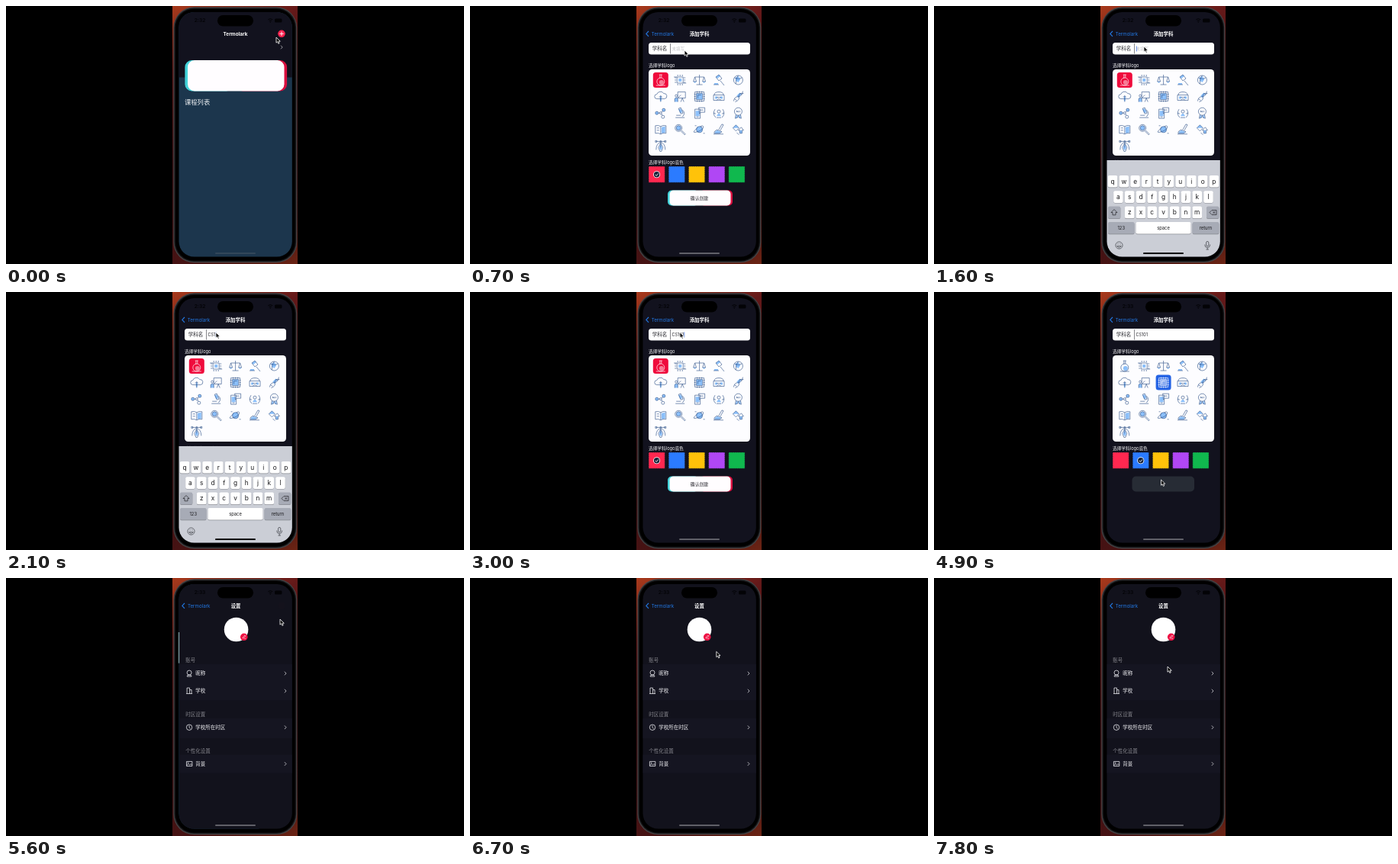
Recreate the animation shown at these times as an HTML page with a canvas. Size 600 px wide and 338 px high, loop 8 s.

```html
<!DOCTYPE html>
<html lang="zh">
<head>
<meta charset="utf-8">
<style>
html, body { margin: 0; width: 100%; height: 100%; overflow: hidden; background: #000; }
canvas { display: block; width: 600px; height: 338px; }
</style>
</head>
<body>
<canvas id="stage"></canvas>
<script>
const LOOP = 8000, STEP = 100, APP = 'Termolark';
const FONT = 'Inter, "Noto Sans CJK SC", "Noto Sans CJK", sans-serif';
const NIGHT = '#12121e', RED = '#fb2350', CYAN = '#43d3da', BACK = '#2278e4';
const SWATCHES = ['#ff2850', '#2b7bff', '#ffc20a', '#b047f4', '#10b84e'];

const canvas = document.getElementById('stage'), g = canvas.getContext('2d');
const ratio = window.devicePixelRatio || 1;
canvas.width = 600 * ratio;
canvas.height = 338 * ratio;

const clamp = v => Math.max(0, Math.min(1, v));
const span = (t, from, to) => clamp((t - from) / (to - from));
const easeOut = u => 1 - (1 - u) ** 3;
const smooth = u => u * u * (3 - 2 * u);

function box(x, y, w, h, r, fill) {
  g.beginPath();
  g.roundRect(x, y, w, h, r);
  g.fillStyle = fill;
  g.fill();
}
function disc(x, y, r, fill) {
  g.beginPath();
  g.arc(x, y, r, 0, 7);
  g.fillStyle = fill;
  g.fill();
}
function line(d, color, width = 0.8) {
  g.strokeStyle = color;
  g.lineWidth = width;
  g.stroke(new Path2D(d));
}
function text(s, x, y, size, color, weight = 400, align = 'left') {
  g.font = `${weight} ${size}px ${FONT}`;
  g.textAlign = align;
  g.fillStyle = color;
  g.fillText(s, x, y + size * 0.37);
}
function shifted(dx, dy, draw, alpha = 1) {
  g.save();
  g.translate(dx, dy);
  g.globalAlpha *= alpha;
  draw();
  g.restore();
}
const chevron = (x, y, color) => line(`M${x - 1} ${y - 2.3}l2.2 2.3l-2.2 2.3`, color);

// Subject icons: outline and tinted area, centred on the origin.
const ring = (x, y, r) => `M${x - r} ${y}a${r} ${r} 0 1 0 ${2 * r} 0a${r} ${r} 0 1 0 ${-2 * r} 0`;
const rect = (x, y, w, h = w) => `M${x} ${y}h${w}v${h}h${-w}z`;
const pins = [-3, 0, 3].map(p => `M${p} -7v2M${p} 5v2M-7 ${p}h2M5 ${p}h2`).join('');
const ICONS = [
  ['M-2 -7h4M-1 -7v5M1 -7v4' + ring(0, 2, 5) + 'M-6 7h12', ring(1, 3, 3)],
  [pins + rect(-4, -4, 8) + 'M-8 -4h4M4 4h4', rect(-2, -2, 4)],
  ['M0 -7V6M-4 6h8M-6 -4H6M-8 2l2 -6l2 6zM4 2l2 -6l2 6z', 'M-8 2h4l-2 2zM4 2h4l-2 2z'],
  ['M-4 -4l4 -3l4 5l-4 3zM2 1l5 6M-7 6h7', 'M-4 -4l4 -3l2 2l-4 3zM-6 4h5v2h-5z'],
  [ring(0, 0, 6) + 'M-5 -3q5 3 10 0M-3 5q-1 -6 3 -11', 'M-4 -3l4 -2l3 4l-3 4l-3 -2z'],
  ['M-5 3a3 3 0 0 1 0 -6a5 5 0 0 1 9 -1a3.5 3.5 0 0 1 1 7zM0 7v-8M-2 1l2 -2l2 2', 'M-1 0h2v6h-2z'],
  [rect(-3, -6, 10, 8) + ring(-5, -1, 1.5) + 'M-7 7v-4q2 -3 4 0v4M-3 2l4 -4M1 7l2 -5l2 5', rect(-7, 2, 4, 5)],
  [pins + rect(-6, -6, 12) + rect(-4, -4, 8) + 'M-2 2v-4h4', rect(-4, -4, 8)],
  [rect(-7, -2, 14, 7) + 'M-6 -2q0 -4 6 -4t6 4M-3 5q3 -4 6 0M-3 1h6', rect(-5, 0, 3) + rect(2, 0, 3)],
  ['M-6 6Q-5 0 0 0T6 -7M-4 7Q2 5 1 0T7 -4M-5 3l3 2M2 -4l3 1', 'M-2 -1l4 -4l2 2l-4 5z'],
  [ring(-5, 0, 2) + ring(4, -4, 2) + ring(3, 5, 2) + ring(0, 0, 1.5) + 'M-3 0h2M1 -1l2 -2M1 1l1 2', ring(-5, 0, 2) + ring(4, -4, 2)],
  ['M-2 -6l3 -1l3 7l-3 1zM3 -4q5 4 0 9M-6 6H6M-5 3h6', 'M-2 -5l3 -1l2 5l-3 1z'],
  [rect(-6, -5, 7, 12) + 'M-1 -7h8v6h-5l-2 2zM-4 5h3M1 -4h4', rect(-5, -3, 5, 7)],
  ['M-4 6q-5 -5 -1 -11M4 6q5 -5 1 -11M-7 0l3 1M7 0l-3 1M-3 6h6' + ring(0, -2, 2), 'M-3 4q3 -7 6 0z'],
  [ring(0, -2, 5) + 'M-3 2l-1 5l3 -1l1 -3l1 3l3 1l-1 -5M-2 -1v-2l2 2v-2M2 -3v2', 'M-3 3h2v3l-2 1zM1 3h2v4l-2 -1z'],
  ['M0 -4q-3 -2 -7 -1v10q4 -1 7 1q3 -2 7 -1v-10q-4 -1 -7 1v10M-5 -2h3M-5 1h3', 'M1 -3l5 -1v8l-5 1z'],
  [ring(-2, -2, 4.5) + ring(-2, -2, 3) + 'M1 2l5 5l1 -1l-5 -5', ring(-2, -2, 3)],
  [ring(0, 0, 4) + 'M-3 -2q-9 8 0 5t8 -7q0 -2 -4 0M5 5h2M-6 -5h2', ring(0, 0, 4)],
  ['M-7 6h13M-6 3q3 -4 6 -2l4 2l-3 2h-7zM0 0l4 -7l2 1l-4 7', 'M-5 3q3 -3 5 -1l3 1l-2 2h-6z'],
  ['M-3 -6l4 4l-4 4l-4 -4zM4 -3l3 4h-2v4h-3v-4h-2zM-2 4l3 3', 'M-3 -6l4 4h-8zM2 1h3v4h-3z'],
  ['M-6 -6H6' + rect(-7, -7, 2) + rect(5, -7, 2) + ring(0, -6, 1) + 'M-6 5q0 -8 6 -10q6 2 6 10M0 -4l-3 6l2 5h2l2 -5zM0 -4v6', 'M0 -3l-2 5l1 3h2l1 -3z']
].map(paths => paths.map(d => new Path2D(d)));

function icon(i, selected, color) {
  const x = 249.8 + 25.4 * (i % 5), y = 97 + 21.6 * Math.floor(i / 5);
  if (selected) box(x - 10, y - 10, 20, 20, 3.5, color);
  shifted(x, y, () => {
    const [outline, tint] = ICONS[i];
    g.fillStyle = selected ? '#ffffff77' : '#8cc0fa';
    g.fill(tint);
    g.strokeStyle = selected ? '#fff' : '#35578c';
    g.lineWidth = 0.65;
    g.stroke(outline);
  });
}

function offsetCard(x, y, w, h, r, gap) {
  box(x - gap, y, w / 2, h, r, CYAN);
  box(x + w / 2, y, w / 2 + gap, h, r, '#d80f3f');
  box(x, y, w, h, r, '#fffdff');
}

function home(t) {
  box(226, 0, 150, 338, 0, '#1c364d');
  box(226, 0, 150, 93.5, 0, NIGHT);
  chevron(361, 54, '#b9b9c0');
  offsetCard(238, 71, 126.5, 40.5, 9, 3.6);
  text('课程列表', 234, 126, 8.3, '#f3f5f7');
  if (t > 4900) {
    box(236, 144, 20, 20, 4, '#2463e4');
    shifted(-54.6, 35.4, () => icon(7, true, '#2463e4'));
    text('CS101', 266, 154, 7, '#fff', 600);
  }
}

function addPage(t) {
  const chosen = t >= 3600 ? 7 : 0, color = t >= 4300 ? 1 : 0;
  box(226, 0, 150, 338, 0, NIGHT);
  box(234, 48, 133, 15.5, 3.5, '#fff');
  text('学科名', 238.7, 56, 6.5, '#24242a');
  box(262, 49, 0.7, 13.5, 0, '#55555c');
  const typed = 'CS101'.slice(0, Math.max(0, Math.floor((t - 1700) / 180) + 1));
  if (typed) text(typed, 264.5, 56, 5.5, '#25252b');
  else text('未填写', 264.5, 56, 5.5, '#c5c5ca');
  if (t >= 1000 && t <= 3000) box(265 + g.measureText(typed).width, 52.5, 0.7, 7, 0, '#3b6fe0');

  text('选择学科logo', 234, 78, 5.7, '#f4f4f6');
  box(234, 83, 133, 113, 4.5, '#fdfdff');
  ICONS.forEach((_, i) => icon(i, i === chosen, color ? '#2463e4' : '#ef0b3c'));

  text('选择学科logo底色', 234, 205, 5.7, '#f4f4f6');
  SWATCHES.forEach((fill, i) => {
    const x = 234 + 26.2 * i;
    box(x, 210, 21.3, 21.3, 0, fill);
    g.setLineDash([1.2, 1.2]);
    line(rect(x, 210, 21.3), NIGHT, 0.8);
    g.setLineDash([]);
    if (i === color) {
      disc(x + 10.6, 220.8, 4.5, '#fff');
      disc(x + 10.6, 220.8, 3.7, '#18233a');
      line(`M${x + 8.7} 220.8l1.5 1.6l2.6 -3`, '#fff', 0.9);
    }
  });

  if (t >= 4800) {
    box(259.5, 241.5, 81.5, 20, 5, '#272c35');
  } else {
    offsetCard(261.5, 241.5, 80, 20, 5, 2.5);
    text('确认创建', 300.5, 252, 5.85, '#222228', 400, 'center');
  }
}

function settings() {
  box(226, 0, 150, 338, 0, '#12121c');
  disc(300.5, 67.5, 15.8, '#fff');
  disc(310.7, 77.3, 4.8, '#ee1244');
  line('M309 79l.4 -1.5l2.6 -2.6l1 1l-2.6 2.6zM311 79.3h2', '#fff', 0.6);
  for (const [label, y, height] of [['账号', 108, 47], ['时区设置', 179, 26], ['个性化设置', 226.5, 24]]) {
    text(label, 234.2, y, 6.5, '#85858c');
    box(226, y + 5, 150, height, 0, '#151521');
  }
  for (const [label, y] of [['昵称', 125], ['学校', 148], ['学校所在时区', 195.7], ['背景', 243.5]]) {
    text(label, 247.2, y, 6.5, '#f2f2f5', 500);
    chevron(364.8, y, '#d2d2d7');
  }
  line(ring(239, 124, 3) + 'M236 129q0 -2 3 -2t3 2z', '#e8e8ec');
  line('M236 151.5v-7.5h3.5v7.5M239.5 146.5h2.5v5M235 151.5h8', '#e8e8ec');
  line(ring(239, 195.7, 3.7) + 'M239 193.3v2.6l1.6 1.4', '#e8e8ec');
  line(rect(235.4, 240.4, 7.4, 6) + 'M235.6 245.5l2.4 -2l1.6 1.4l1.4 -1.4l1.8 1.5' + ring(237.5, 242.2, 0.4), '#e8e8ec');
}

function key(label, x, y, w, fill, size = 8.3) {
  box(x, y + 0.7, w, 15.6, 2, '#898b92');
  box(x, y, w, 15.6, 2, fill);
  text(label, x + w / 2, y + 7.6, size, '#17171a', 400, 'center');
}
function keyboard() {
  const grey = '#a7abb6', ink = '#222226';
  box(226, 202, 150, 136, 0, '#cbced6');
  ['qwertyuiop', 'asdfghjkl', 'zxcvbnm'].forEach((row, r) => {
    const left = 300.5 - row.length * 7.38;
    [...row].forEach((c, i) => key(c, left + 14.76 * i + 1.1, 222 + 20.3 * r, 12.5, '#fff'));
  });
  key('', 228, 262.6, 16.3, grey);
  key('', 357, 262.6, 16.3, grey);
  key('123', 228, 283, 34.5, grey, 5.8);
  key('space', 264.5, 283, 72, '#fff', 5.8);
  key('return', 338.6, 283, 34.7, grey, 5.8);
  line('M236 266.5l-4 4h2v3.3h4v-3.3h2z', ink, 0.7);
  line('M361 270.5l3 -3h6v6h-6zM365.3 269l3 3M368.3 269l-3 3', ink, 0.7);
  line(ring(242.5, 313.5, 4.6) + 'M239.7 314.5q2.8 4 5.6 0zM241 311.2v1.2M244 311.2v1.2', '#4a4c52', 0.8);
  line('M356.6 310a1.6 1.6 0 0 1 3.2 0v3a1.6 1.6 0 0 1 -3.2 0zM354.7 312.5q0 4 3.5 4t3.5 -4M358.2 316.5v2.5M356.5 319h3.4', '#4a4c52', 0.8);
}

function navBar(addShown, setShown) {
  const p = Math.max(addShown, setShown);
  shifted(-35 * p, 0, () => text(APP, 300.5, 36.3, 6.4, '#fff', 700, 'center'), 1 - p);
  shifted(0, 0, () => {
    disc(361, 36.3, 4.8, RED);
    line('M358.3 36.3h5.4M361 33.6v5.4', '#fff', 0.9);
  }, 1 - p);
  shifted(40 * (1 - p), 0, () => text(APP, 237.7, 36.3, 6.2, BACK), p);
  shifted(0, 0, () => line('M234 33l-3.2 3.4l3.2 3.4', BACK, 1.1), p);
  shifted(74 * (1 - p), 0, () => text(addShown ? '添加学科' : '设置', 300.5, 36.3, 6.4, '#fff', 700, 'center'), p);
}

function phoneBody() {
  const wall = g.createLinearGradient(218, 0, 382, 338);
  [[0, '#a83a1c'], [0.2, '#641919'], [0.5, '#3c1014'], [0.85, '#471313'], [1, '#6b2414']].forEach(s => wall.addColorStop(...s));
  box(218, 0, 164, 338, 0, wall);
  box(219.3, 1.3, 162, 335, 27, '#434345');
  box(220.5, 2.5, 159.6, 332.6, 26, '#151517');
  box(222, 4, 156.6, 329.6, 24.5, '#000');
}
function statusBar(t) {
  const ink = '#030306';
  text(t < 4000 ? '2:32' : '2:33', 254, 19, 6.6, ink, 600, 'center');
  line('M343.3 17.8q3 -2.4 6 0M344.6 19.4q1.7 -1.3 3.4 0', ink, 1);
  disc(346.3, 21, 0.8, ink);
  box(352, 16.5, 9.5, 5, 1.5, ink);
  box(277, 12, 47, 14.5, 7.25, '#000');
}

const POINTER = [
  [0, 354, 41], [150, 360, 35], [300, 360, 35], [700, 281, 58], [1000, 281, 58],
  [1500, 275, 53], [3050, 275, 53], [3500, 299, 118], [3700, 299, 118], [4200, 270, 220],
  [4350, 270, 220], [4700, 297.5, 246], [5000, 297.5, 246], [5350, 359, 54],
  [5700, 359, 54], [7300, 306, 116], [LOOP, 306, 116]
];
function pointer(t) {
  const i = POINTER.findIndex(p => p[0] > t);
  const [t0, x0, y0] = POINTER[i - 1], [t1, x1, y1] = POINTER[i];
  const u = smooth(span(t, t0, t1));
  shifted(x0 + (x1 - x0) * u, y0 + (y1 - y0) * u, () => {
    const arrow = new Path2D('M0 0v7.2l1.7 -1.5l1.2 2.7l1.3 -.6l-1.2 -2.6h2.3z');
    g.fillStyle = '#000';
    g.fill(arrow);
    g.strokeStyle = '#fff';
    g.lineWidth = 0.8;
    g.stroke(arrow);
  });
}

function draw(t) {
  const addShown = easeOut(span(t, 200, 460)) * (1 - easeOut(span(t, 4950, 5230)));
  const setShown = easeOut(span(t, 5350, 5660));
  const keys = easeOut(span(t, 900, 1180)) * (1 - easeOut(span(t, 2720, 2980)));
  const shown = Math.max(addShown, setShown);

  g.setTransform(ratio, 0, 0, ratio, 0, 0);
  box(0, 0, 600, 338, 0, '#000');
  phoneBody();
  g.save();
  g.beginPath();
  g.roundRect(226.5, 8, 148.3, 320.5, 20);
  g.clip();
  if (shown < 1) shifted(-45 * shown, 0, () => home(t));
  box(226, 0, 150, 338, 0, `rgba(0,0,0,${0.12 * shown})`);
  if (addShown) shifted(149 * (1 - addShown), 0, () => addPage(t));
  if (setShown) shifted(149 * (1 - setShown), 0, settings);
  navBar(addShown, setShown);
  statusBar(t);
  if (keys) shifted(0, 130 * (1 - keys), keyboard);
  box(274, 323, 53, 2, 1, keys > 0.5 ? '#000' : shown > 0.5 ? '#606068' : '#33475a');
  g.restore();
  pointer(t);
}

function tick(now) {
  draw(Math.floor((now % LOOP) / STEP) * STEP);
  requestAnimationFrame(tick);
}
requestAnimationFrame(tick);
</script>
</body>
</html>
```
